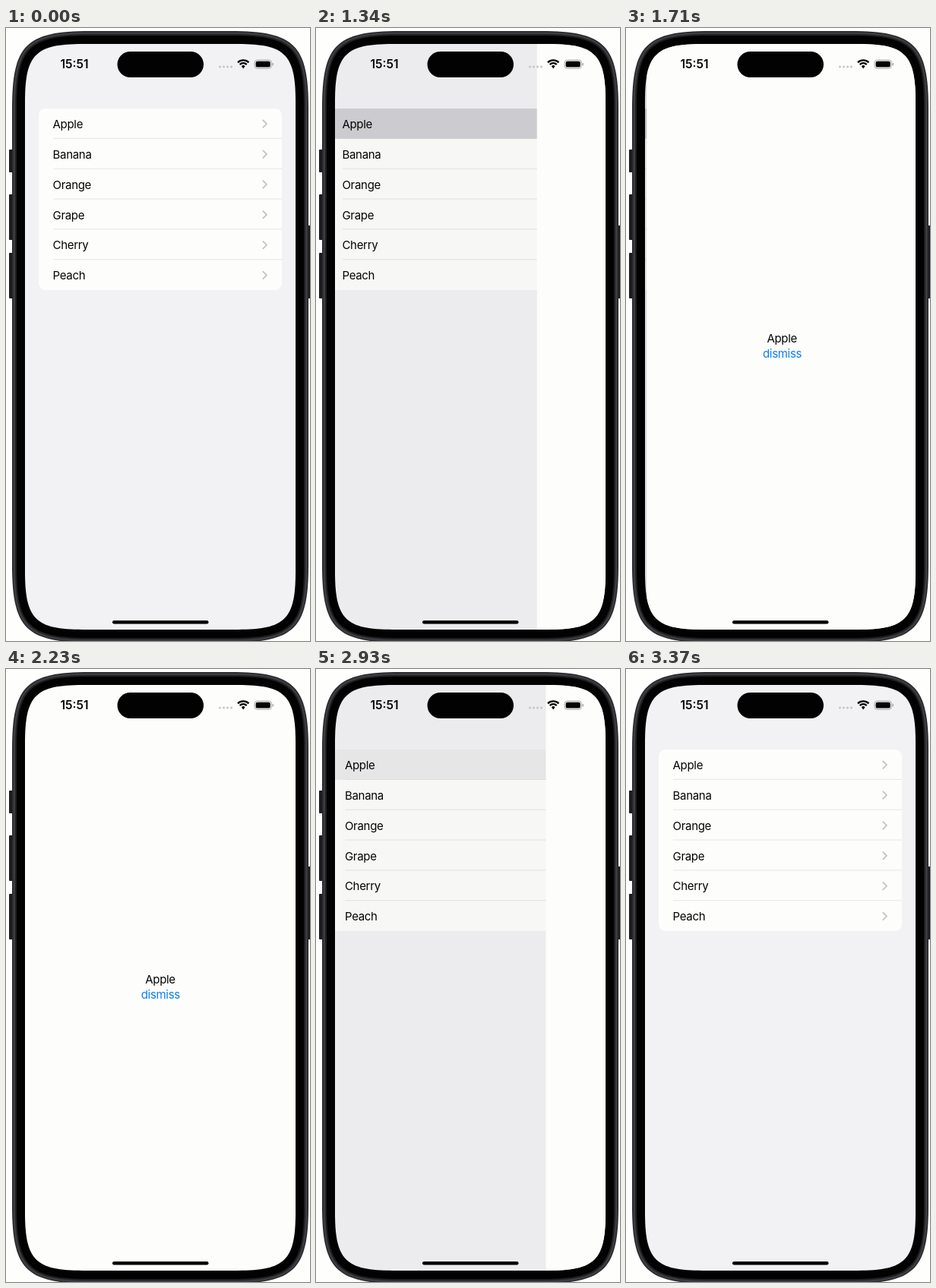
Recreate the animation shown at these times as an HTML page with a canvas. Size 400 px wide and 807 px high, loop 3.4 s.

```html
<!DOCTYPE html>
<html lang="en">
<head>
<meta charset="utf-8">
<title>Fruit list navigation</title>
<style>
  html, body { margin: 0; width: 100%; height: 100%; overflow: hidden; background: #fefefd; }
  canvas { display: block; width: 400px; height: 807px; }
</style>
</head>
<body>
<canvas id="stage"></canvas>
<script>
const W = 400, H = 807, LOOP = 3400;
const STEP = 37.085; // ms between picture updates
const SCREEN = { x: 25, y: 21, w: 356, h: 771, r: 50 };
const FRUITS = ['Apple', 'Banana', 'Orange', 'Grape', 'Cherry', 'Peach'];
const CARD = { x: 43, y: 106, w: 320, row: 39.85 };
const PUSH = { press: 1215, start: 1277 };
const POP = { press: 2680, start: 2758.5 };
const RATE = 0.01672;
const INK = '#040404', BLACK = '#020202', PAPER = '#fdfdfc', GREY = '#c4c4c7';
const FONT = 'Inter, Roboto, sans-serif';

const canvas = document.getElementById('stage');
const ctx = canvas.getContext('2d');
const dpr = window.devicePixelRatio || 1;
canvas.width = W * dpr;
canvas.height = H * dpr;

const clamp = v => Math.min(1, Math.max(0, v));
const smooth = v => v * v * (3 - 2 * v);

// Critically damped spring, falling from 1 to 0.
function spring(ms) {
  if (ms <= 0) return 1;
  const u = ms * RATE, left = (1 + u) * Math.exp(-u);
  return left < 0.001 ? 0 : left;
}

function rounded(x, y, w, h, r, fill) {
  ctx.beginPath();
  ctx.roundRect(x, y, w, h, r);
  ctx.fillStyle = fill;
  ctx.fill();
}

// Rectangle whose corners ease into the straight edges.
function softRect(x, y, w, h, r) {
  const e = 1.528 * r, c = 0.272 * r, R = x + w, B = y + h;
  ctx.beginPath();
  ctx.moveTo(x, y + e);
  ctx.bezierCurveTo(x, y + c, x + c, y, x + e, y);
  ctx.lineTo(R - e, y);
  ctx.bezierCurveTo(R - c, y, R, y + c, R, y + e);
  ctx.lineTo(R, B - e);
  ctx.bezierCurveTo(R, B - c, R - c, B, R - e, B);
  ctx.lineTo(x + e, B);
  ctx.bezierCurveTo(x + c, B, x, B - c, x, B - e);
  ctx.closePath();
}

function rect(x, y, w, h, fill) {
  ctx.fillStyle = fill;
  ctx.fillRect(x, y, w, h);
}

function text(str, x, y, { fill = INK, align = 'left', weight = 400, size = 15, gap = -0.3 } = {}) {
  ctx.font = `${weight} ${size}px ${FONT}`;
  ctx.letterSpacing = gap + 'px';
  ctx.textAlign = align;
  ctx.fillStyle = fill;
  ctx.fillText(str, x, y);
}

function shell(grow, fill) {
  const { x, y, w, h, r } = SCREEN;
  softRect(x - grow, y - grow, w + 2 * grow, h + 2 * grow, r + grow);
  ctx.fillStyle = fill;
  ctx.fill();
}

function drawBody() {
  rect(0, 0, W, H, '#fefefd');
  for (const [y, h] of [[160, 30], [219, 60], [296, 60]]) rounded(4, y, 6, h, 1, '#1d1d20');
  rounded(396, 260, 6, 96, 1, '#1d1d20');
  shell(17, '#28282b');
  shell(15.5, '#3c3c41');
  shell(13, '#202023');
  shell(11, BLACK);
}

function drawList(cover, held) {
  rect(SCREEN.x, SCREEN.y, SCREEN.w, SCREEN.h, '#f2f2f5');
  ctx.save();
  ctx.translate(-0.3 * SCREEN.w * cover, 0);
  ctx.save();
  ctx.beginPath();
  ctx.roundRect(CARD.x, CARD.y, CARD.w, CARD.row * 6, 9);
  ctx.clip();
  rect(CARD.x, CARD.y, CARD.w, CARD.row * 6, PAPER);
  for (let i = 1; i < 6; i++) rect(62, CARD.y + i * CARD.row - 1, 301, 1, '#e6e6e8');
  rect(CARD.x, CARD.y, CARD.w, CARD.row, `rgba(209,209,213,${held})`);
  ctx.restore();
  FRUITS.forEach((name, i) => {
    const mid = 126.2 + i * CARD.row;
    text(name, 61.5, mid + 5.8);
    ctx.beginPath();
    ctx.moveTo(338.3, mid - 4.7);
    ctx.lineTo(343, mid);
    ctx.lineTo(338.3, mid + 4.7);
    ctx.strokeStyle = GREY;
    ctx.lineWidth = 1.8;
    ctx.lineCap = ctx.lineJoin = 'round';
    ctx.stroke();
  });
  ctx.restore();
  rect(SCREEN.x, SCREEN.y, SCREEN.w, SCREEN.h, `rgba(0,0,0,${0.1 * cover})`);
}

function drawDetail(dx, fade) {
  rect(SCREEN.x + dx, SCREEN.y, SCREEN.w, SCREEN.h, PAPER);
  text('Apple', 203 + dx, 413.5, { align: 'center' });
  ctx.globalAlpha = fade;
  text('dismiss', 203.3 + dx, 433.5, { fill: '#0a7ef0', align: 'center' });
  ctx.globalAlpha = 1;
}

function drawStatus() {
  text('15:51', 90, 53, { align: 'center', weight: 600, size: 15.5, gap: 0 });
  rounded(146.5, 31, 113.5, 34, 17, BLACK);
  for (let i = 0; i < 4; i++) rounded(280 + i * 5, 49.5, 3, 3, 1.5, GREY);

  ctx.strokeStyle = INK;
  ctx.lineCap = 'butt';
  ctx.lineWidth = 2.3;
  for (const r of [10.2, 6.4]) {
    ctx.beginPath();
    ctx.arc(312.2, 52.6, r, -Math.PI * .75, -Math.PI * .25);
    ctx.stroke();
  }
  ctx.beginPath();
  ctx.moveTo(312.2, 53.4);
  ctx.arc(312.2, 52.6, 3.3, -Math.PI * .75, -Math.PI * .25);
  ctx.fillStyle = INK;
  ctx.fill();

  ctx.beginPath();
  ctx.roundRect(327, 42.2, 22.4, 11, 3.6);
  ctx.strokeStyle = '#a4a4a6';
  ctx.lineWidth = 1;
  ctx.stroke();
  rounded(328.6, 43.8, 19.2, 7.8, 2.2, INK);
  rounded(350.6, 46, 1.3, 3.6, .6, '#a4a4a6');
  rounded(140, 780, 126.5, 4.5, 2.25, BLACK);
}

function draw(t) {
  const opening = t < 2200;
  const left = opening ? spring(t - PUSH.start) : 1 - spring(t - POP.start);
  const cover = 1 - left;
  const held = opening ? +(t >= PUSH.press) : 1 - smooth(clamp((t - POP.start) / 300));
  const fade = t < POP.press ? 1 : 0.2 + 0.8 * smooth(clamp((t - POP.start) / 470));

  ctx.setTransform(dpr, 0, 0, dpr, 0, 0);
  drawBody();
  ctx.save();
  softRect(SCREEN.x, SCREEN.y, SCREEN.w, SCREEN.h, SCREEN.r);
  ctx.clip();
  if (cover < 1) drawList(cover, held);
  if (cover > 0) drawDetail(left * SCREEN.w, fade);
  drawStatus();
  ctx.restore();
}

// Pictures change on whole hundredths of a second, one per STEP.
function held(t) {
  return Math.floor((Math.floor(t / 10) * 10 + 5) / STEP) * STEP;
}

const began = performance.now();
function tick() {
  draw(held((performance.now() - began) % LOOP));
  requestAnimationFrame(tick);
}
draw(0);
requestAnimationFrame(tick);
</script>
</body>
</html>
```
